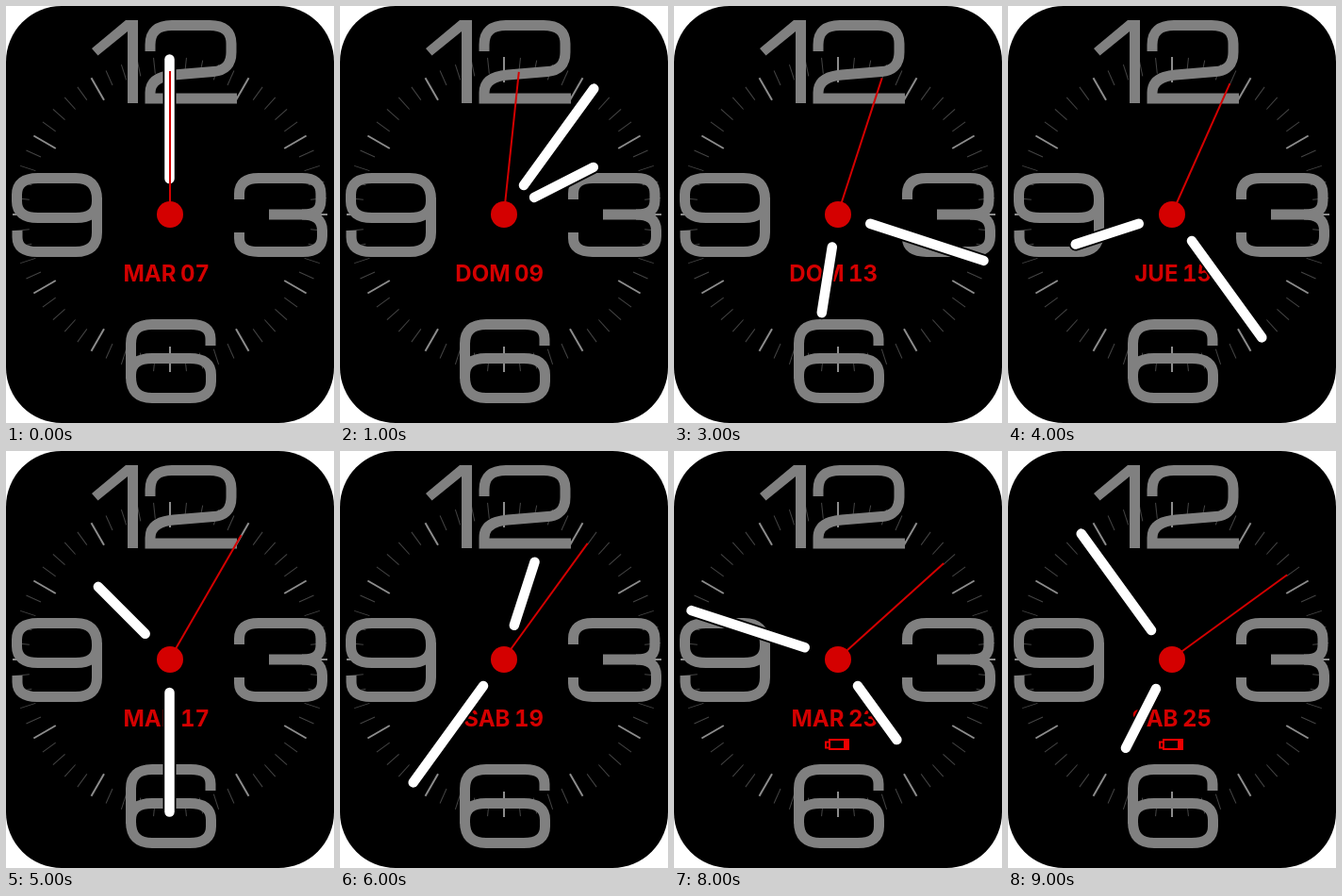
An HTML page that plays this animation: 348 by 442 pixels, repeating every 10 s.

```html
<!DOCTYPE html>
<html lang="es">
<head>
<meta charset="utf-8">
<title>Watch face</title>
<style>
  html, body { margin: 0; width: 100%; height: 100%; overflow: hidden; background: #fff; }
  svg { display: block; width: 100%; height: 100%; }
  .numerals { fill: none; stroke: #808080; stroke-width: 11; }
  .date { font: 700 24px Inter, "Open Sans", sans-serif; font-variant-numeric: tabular-nums; fill: #d40000; }
  .hand { stroke-linecap: round; }
</style>
</head>
<body>
<svg viewBox="0 0 348 442">
  <rect width="348" height="442" rx="59"/>
  <g id="ticks"></g>

  <g class="numerals">
    <path d="M127 15H140V103H129V27L97.500 52.500L91 45Z" fill="#808080" stroke="none"/>
    <path d="M153 48V41Q153 20.500 176 20.500H216Q239 20.500 239 40V49Q239 68 220 69.500L178 73Q153 75 153 92V98H245"/>
    <path d="M247.500 205V199Q247.500 182.500 268 182.500H314Q334 182.500 334 199V206Q334 221 316 221H279"/>
    <path d="M314 221Q335.500 221 335.500 238V244Q335.500 260.500 315 260.500H268Q247.500 260.500 247.500 246V240"/>
    <path id="nine" d="M96.500 205Q96.500 182.500 74 182.500H34Q11.500 182.500 11.500 200V207Q11.500 224.500 34 224.500H74Q96.500 224.500 96.500 207M96.500 203V240Q96.500 260.500 74 260.500H33Q12 260.500 12 245V238"/>
    <use href="#nine" transform="rotate(180 114.500 299)"/>
  </g>

  <g class="date">
    <text id="weekday" x="180.500" y="292" text-anchor="end"></text>
    <text id="day" x="185" y="292"></text>
  </g>

  <g id="battery" fill="none" stroke="#f00000" stroke-width="2">
    <rect x="165" y="306" width="20" height="10"/>
    <path d="M165 308.500H161V314.500H165"/>
    <path d="M182 307V315" stroke-width="4"/>
  </g>

  <g id="hour" class="hand"></g>
  <g id="minute" class="hand"></g>
  <g id="second"></g>
  <circle cx="174" cy="221" r="14" fill="#d40000"/>
</svg>
<script>
const el = id => document.getElementById(id);

// A line pointing up from the origin, between two distances from it.
const line = (from, to, color, width) =>
  `<path d="M0 ${-from}V${-to}" stroke="${color}" stroke-width="${width}"/>`;

const turned = (x, y, degrees) => `translate(${x} ${y}) rotate(${degrees})`;

const WEEKDAYS = ["DOM", "LUN", "MAR", "MIE", "JUE", "VIE", "SAB"];

// A black edge keeps the white hands clear of the numerals.
const whiteHand = length => line(36.5, length, "#000", 14) + line(36.5, length, "#fff", 10.5);

const HANDS = {
  hour: { x: 173.5, y: 219.5, degrees: 63, shape: whiteHand(107) },
  minute: { x: 173.5, y: 219.5, degrees: 36, shape: whiteHand(163) },
  second: { x: 174, y: 220, degrees: 6, shape: line(0, 151, "#d40000", 2) },
};

for (const id in HANDS) el(id).innerHTML = HANDS[id].shape;

el("ticks").innerHTML = Array.from({ length: 60 }, (_, i) => {
  const tick = i % 5 ? line(150, 167, "#444", 1) : line(140, 167, "#8c8c8c", 2);
  return `<g transform="${turned(174, 221, i * 6)}">${tick}</g>`;
}).join("");

// Each step adds 2 h 6 min 1 s, one month and two days, and drains 10 % battery.
function show(step) {
  const date = new Date(2014, step, 7 + 2 * step);
  el("weekday").textContent = WEEKDAYS[date.getDay()];
  el("day").textContent = String(date.getDate()).padStart(2, "0");
  el("battery").style.display = 100 - 10 * step <= 20 ? "" : "none";
  for (const id in HANDS) {
    const { x, y, degrees } = HANDS[id];
    el(id).setAttribute("transform", turned(x, y, step * degrees));
  }
}

let shown = -1;
function frame() {
  const step = Math.floor(performance.now() / 1000) % 10;
  if (step !== shown) show(shown = step);
  requestAnimationFrame(frame);
}
frame();
</script>
</body>
</html>
```
